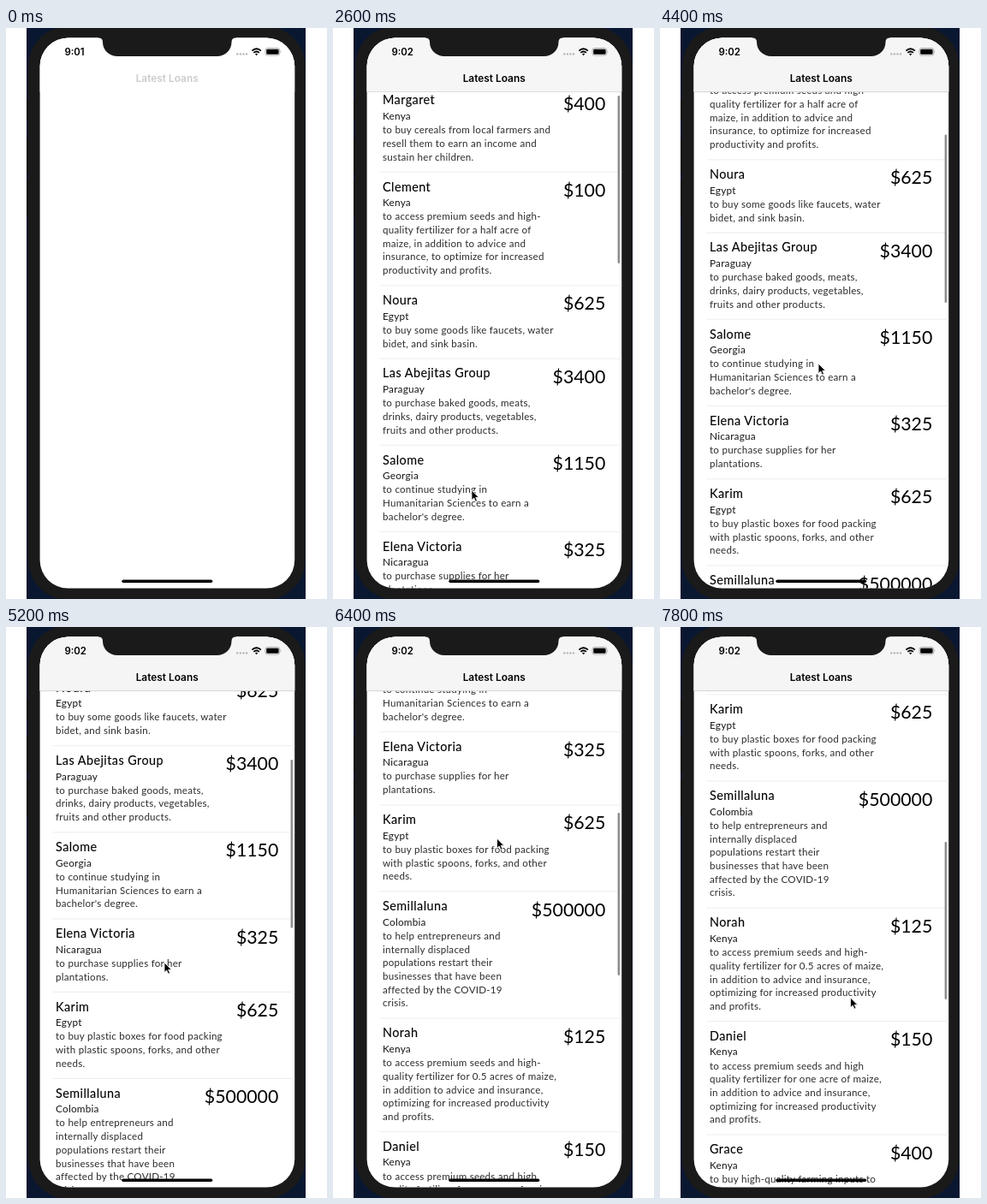
These frames come from a looping animation (375 px wide and 667 px high, 8000 ms). An HTML page:

```html
<!DOCTYPE html>
<html lang="en">
<head>
<meta charset="utf-8">
<title>Latest Loans</title>
<style>
  html, body { margin: 0; width: 100%; height: 100%; overflow: hidden; background: #fff; }
  svg { display: block; width: 375px; height: 667px; }
  text { font-family: Lato, sans-serif; fill: #000; }
  .ui { font-family: Inter, sans-serif; font-weight: 600; }
  .name { font-size: 14.4px; letter-spacing: .44px; stroke: #000; stroke-width: .1px; }
  .place { font-size: 11.8px; letter-spacing: .22px; fill: #161616; }
  .use { font-size: 11.6px; letter-spacing: .24px; fill: #2c2c2c; }
  .sum { font-size: 21.3px; text-anchor: end; }
</style>
</head>
<body>
<svg viewBox="0 0 375 667">
  <defs>
    <clipPath id="screen"><rect x="39.6" y="11.6" width="297.6" height="643" rx="33"/></clipPath>
  </defs>

  <rect x="24" width="326" height="667" fill="#0a1730"/>
  <g fill="#0c0c0e">
    <rect x="24" y="84" width="4" height="24"/>
    <rect x="24" y="128" width="4" height="43"/>
    <rect x="24" y="178" width="4" height="43"/>
  </g>
  <rect x="26" y="-2" width="323.6" height="670" rx="47" fill="#1a1a1a"/>

  <g clip-path="url(#screen)">
    <rect x="39" y="11" width="299" height="645" fill="#fff"/>
    <g id="list"></g>
    <rect x="39" y="11" width="299" height="63.5" fill="#fff"/>
    <g id="nav">
      <rect x="39" y="11" width="299" height="63.5" fill="#f5f5f5"/>
      <path d="M39 74.6H338" stroke="#cbcbcb" stroke-width=".8"/>
    </g>
    <rect id="bar" x="332.6" width="2.4" rx="1.2" fill="#8c8c8c"/>
    <text id="title" class="ui" x="188.2" y="63" font-size="11.9" text-anchor="middle">Latest Loans</text>

    <text id="clock" class="ui" x="68.4" y="32" font-size="11.4"></text>
    <g fill="#b4b4b4">
      <circle cx="270.3" cy="30.4" r="1.2"/><circle cx="273.9" cy="30.4" r="1.2"/>
      <circle cx="277.5" cy="30.4" r="1.2"/><circle cx="281.1" cy="30.4" r="1.2"/>
    </g>
    <g fill="none" stroke="#000" stroke-width="1.8">
      <path d="M287.4 26.7Q292.6 21.9 297.8 26.7"/>
      <path d="M289.3 28.9Q292.6 26 295.9 28.9"/>
    </g>
    <path d="M290.9 30.3Q292.6 29 294.3 30.3L292.6 32.2Z"/>
    <rect x="303" y="23.6" width="16.8" height="8.4" rx="2.4" fill="none" stroke="#9a9a9a" stroke-width=".8"/>
    <rect x="304.2" y="24.8" width="14.4" height="6" rx="1.3"/>
    <path d="M320.7 26.3q1.3 1.5 0 3z" fill="#8a8a8a"/>
  </g>

  <path fill="#1a1a1a" d="M108 11V11.600q5 0 5 5a17 16.400 0 0 0 17 16.400H246.500a17 16.400 0 0 0 17-16.400q0-5 5-5V11z"/>
  <rect x="135.3" y="644.5" width="106" height="3.4" rx="1.7"/>
  <path id="cursor" d="M0 0V11.500L2.700 9L4.500 13.200L6.500 12.300L4.700 8.300H8.300Z" stroke="#fff" stroke-width=".8"/>
</svg>

<script>
const LOOP = 8000, STEP = 200;
const LIST_TOP = 74.7, LINE = 15.7;
const $ = id => document.getElementById(id);

// name, country, amount, purpose
const loans = [
  ["Margaret", "Kenya", 400, "to buy cereals from local farmers and|resell them to earn an income and|sustain her children."],
  ["Clement", "Kenya", 100, "to access premium seeds and high-|quality fertilizer for a half acre of|maize, in addition to advice and|insurance, to optimize for increased|productivity and profits."],
  ["Noura", "Egypt", 625, "to buy some goods like faucets, water|bidet, and sink basin."],
  ["Las Abejitas Group", "Paraguay", 3400, "to purchase baked goods, meats,|drinks, dairy products, vegetables,|fruits and other products."],
  ["Salome", "Georgia", 1150, "to continue studying in|Humanitarian Sciences to earn a|bachelor's degree."],
  ["Elena Victoria", "Nicaragua", 325, "to purchase supplies for her|plantations."],
  ["Karim", "Egypt", 625, "to buy plastic boxes for food packing|with plastic spoons, forks, and other|needs."],
  ["Semillaluna", "Colombia", 500000, "to help entrepreneurs and|internally displaced|populations restart their|businesses that have been|affected by the COVID-19|crisis."],
  ["Norah", "Kenya", 125, "to access premium seeds and high-|quality fertilizer for 0.5 acres of maize,|in addition to advice and insurance,|optimizing for increased productivity|and profits."],
  ["Daniel", "Kenya", 150, "to access premium seeds and high|quality fertilizer for one acre of maize,|in addition to advice and insurance,|optimizing for increased productivity|and profits."],
  ["Grace", "Kenya", 400, "to buy high-quality farming inputs to|improve her harvest."]
];

const label = (kind, x, y, text) => `<text class="${kind}" x="${x}" y="${y}">${text}</text>`;

let rowTop = LIST_TOP;
$("list").innerHTML = loans.map(([name, place, sum, use]) => {
  const top = rowTop, lines = use.split("|");
  rowTop += 54 + LINE * lines.length;
  return label("name", 58, top + 22.2, name)
    + label("place", 58, top + 39.8, place)
    + label("sum", 318.3, top + 28.6, "$" + sum)
    + lines.map((line, i) => label("use", 58, top + 56 + i * LINE, line)).join("")
    + `<path d="M54.5 ${rowTop}H338" stroke="#e9e9e9" stroke-width=".8"/>`;
}).join("");

const linear = p => p;
const easeIn = p => p * p;
const easeOut = p => 1 - (1 - p) ** 2;

// Each table row: time, values..., easing towards the next row
const scrolling = [ // offset, bar top, bar height
  [1600, 0, 77, 196, easeIn],
  [2600, 7.5, 79, 196, easeIn],
  [3400, 36.7, 88, 196.5, linear],
  [4400, 154.5, 124.5, 196.5, easeOut],
  [5200, 255, 155, 196.5, linear],
  [6400, 473.5, 217, 190, easeOut],
  [7800, 602.5, 251, 184, linear]
];
const pointing = [ // tip x, tip y
  [1600, 330, 600, easeOut],
  [2400, 162, 547, linear],
  [2600, 162, 540, easeIn],
  [3400, 162, 505, linear],
  [4400, 185, 392, linear],
  [5200, 185, 392, linear],
  [6400, 191.5, 247, easeOut],
  [7800, 222.5, 433, linear]
];

function sample(table, t) {
  const last = table[table.length - 1];
  if (t <= table[0][0]) return table[0].slice(1, -1);
  if (t >= last[0]) return last.slice(1, -1);
  const i = table.findIndex(row => row[0] > t);
  const from = table[i - 1], to = table[i];
  const p = from[from.length - 1]((t - from[0]) / (to[0] - from[0]));
  return from.slice(1, -1).map((v, k) => v + (to[k + 1] - v) * p);
}

const ramp = (t, start, end) => Math.min(1, Math.max(0, (t - start) / (end - start)));

function draw(t) {
  const [offset, barTop, barHeight] = sample(scrolling, t);
  const [x, y] = sample(pointing, t);
  $("list").setAttribute("transform", `translate(0 ${-offset})`);
  $("list").setAttribute("opacity", ramp(t, 200, 600));
  $("title").setAttribute("opacity", t < STEP ? .2 : 1);
  $("nav").setAttribute("opacity", ramp(t, 1600, 2800));
  $("bar").setAttribute("y", barTop);
  $("bar").setAttribute("height", barHeight);
  $("bar").setAttribute("opacity", ramp(t, 2000, 2400));
  $("clock").textContent = t < 1000 ? "9:01" : "9:02";
  $("cursor").setAttribute("transform", `translate(${x} ${y})`);
  $("cursor").setAttribute("opacity", t < 1600 ? 0 : 1);
}

const start = performance.now();
function tick() {
  const t = (performance.now() - start) % LOOP;
  draw(Math.floor(t / STEP) * STEP);
  requestAnimationFrame(tick);
}
tick();
</script>
</body>
</html>
```
